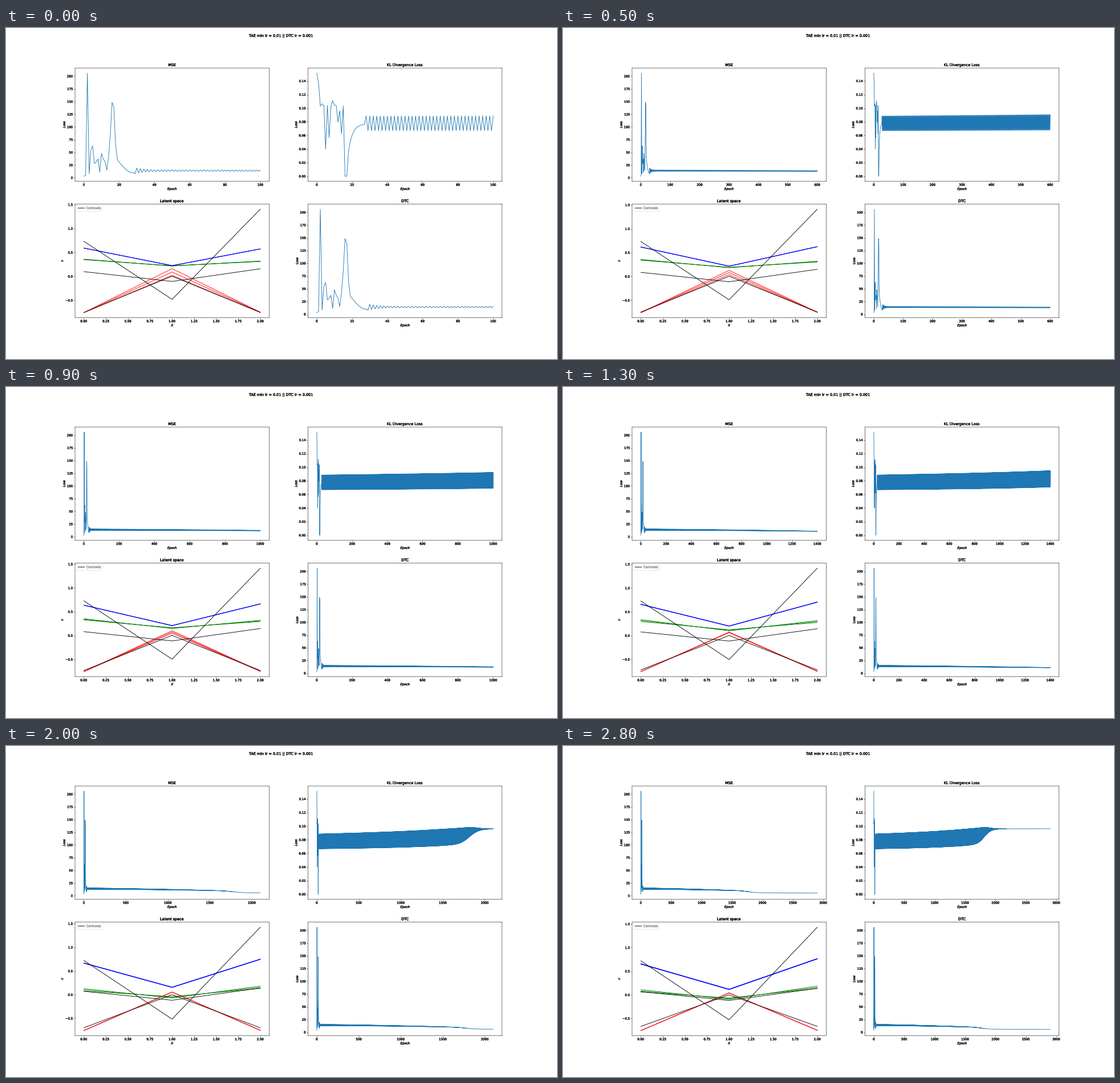
Animation of 966x580 px, one loop 2.9 s. Source, as a matplotlib script:

```python
import numpy as np
import matplotlib.pyplot as plt
from matplotlib.animation import FuncAnimation
from matplotlib.patheffects import Normal, withStroke

WIDTH, HEIGHT, DPI = 966, 580, 38.64
FRAMES, INTERVAL = 29, 100
STEP = 100  # epochs per frame
LAST = FRAMES * STEP

plt.rcParams.update({
    "font.family": "DejaVu Sans",
    "axes.linewidth": 1.0,
    "lines.linewidth": 1.65,
    "xtick.major.width": 1.0,
    "ytick.major.width": 1.0,
})
HEAVY = [withStroke(linewidth=0.65, foreground="black")]


def settle(epoch, center, width):
    """Smooth step from 0 to 1 around the center epoch."""
    return 1 / (1 + np.exp((center - epoch) / width))


def blend(a, b, weight):
    return a + (b - a) * weight


# --- training curves -------------------------------------------------------

EPOCHS = np.arange(LAST + 1)
T = EPOCHS / 1000


def training_curve(warmup, recovery, start, middle, swing):
    """Warm-up values, a smooth recovery, then a zigzag (even epochs high)."""
    curve = middle + swing * np.where(EPOCHS % 2, -1, 1)
    curve[:start] = recovery[:start]
    curve[:len(warmup)] = warmup
    return curve


mse = training_curve(
    warmup=[3, 5, 206, 8, 55, 62.5, 28, 31, 37, 11, 48, 37, 32, 15, 42, 85,
            148.5, 139, 64],
    recovery=9.7 + 26 * (np.abs(27.5 - EPOCHS) / 8.5) ** 1.6,
    start=29,
    middle=blend(14 - 1.9 * T ** 1.5, 6.8 - 0.5 * T,
                 settle(EPOCHS, 1790, 60)),
    swing=(1.4 * np.clip(1 - T / 1.9, 0, 1) ** 1.1
           + 5 * np.exp((29 - EPOCHS.clip(29)) / 5)))

kl = training_curve(
    warmup=[.1515, .137, .103, .1065, .104, .040, .104, .0565, .103, .111,
            .1045, .104, .0795, .096, .062, .1035, 0, 0],
    recovery=.077 - .040 * np.exp((18 - EPOCHS) / 2.3),
    start=28,
    middle=blend(.0776 + .0024 * T + .0007 * T ** 3, .0952 + .0004 * T,
                 settle(EPOCHS, 1810, 50)),
    swing=(.0108 + .0009 * T) * (1 - settle(EPOCHS, 1830, 60)))


# --- latent space ----------------------------------------------------------

# heights at x = 0, 1, 2: first pose, last pose, easing power
CENTROIDS = [
    ((.735, -.480, 1.405), (.720, -.528, 1.432), 1),
    ((.100, -.105, .160), (.068, -.118, .138), 0.5),
    ((-.755, .005, -.754), (-.667, .000, -.667), 1.25),
]


def latent_lines(epoch):
    """Three red, three green, three blue lines and the centroids."""
    t = epoch / 1000
    side = np.array([1, 0, -1])[:, None]

    red = np.array([-.757, .094 - .018 * t, -.750])
    red = red + side * [0, .075 * max(0, 1 - t / 1.5), .002]

    green = blend(
        np.array([.355 - .014 * t**2, .225 - .05 * t - .018 * t**2,
                  .318 - .010 * t]),
        np.array([.085, -.02 - .021 * t, .10 + .021 * t]),
        settle(epoch, 1800, 130))
    spread = .005 + .02 * min(t / 1.6, 1) ** 2
    green = green + side * spread * [1, -.6, 1]

    blue = blend(
        np.array([.588 + .05 * t, .227 - .018 * t, .565 + .10 * t]),
        np.array([.655, .203 - .03 * t, .66 + .036 * t]),
        settle(epoch, 2000, 150))
    blue = blue + side * (.001 + .0015 * t)

    progress = (epoch - STEP) / (LAST - STEP)
    centroids = [blend(np.array(first), np.array(last), progress ** power)
                 for first, last, power in CENTROIDS]
    return [*red, *green, *blue, *centroids]


# --- figure ----------------------------------------------------------------

fig = plt.figure(figsize=((WIDTH + 1e-6) / DPI, (HEIGHT + 1e-6) / DPI),
                 dpi=DPI, facecolor="white")
fig.suptitle("TAE min lr = 0.01 || DTC lr = 0.001", path_effects=HEAVY)

COLUMNS = [(225.5, 859.5), (986.5, 1620.5)]
ROWS = [(130.5, 500.5), (574.5, 945.5)]


def panel(row, column, title, xlabel, ylabel):
    left, right = (x / 1800 for x in COLUMNS[column])
    top, bottom = (1 - y / 1080 for y in ROWS[row])
    ax = fig.add_axes([left, bottom, right - left, top - bottom])
    ax.set_title(title, path_effects=HEAVY)
    ax.set_xlabel(xlabel, style="italic", path_effects=HEAVY)
    ax.set_ylabel(ylabel, style="italic", path_effects=HEAVY)
    for spine in ax.spines.values():
        spine.set_snap(False)
    return ax


losses = []
for row, column, title, curve in [(0, 0, "MSE", mse),
                                  (0, 1, "KL Divergence Loss", kl),
                                  (1, 1, "DTC", mse + kl)]:
    ax = panel(row, column, title, "Epoch", "Loss")
    losses.append((ax.plot([], [], color="C0")[0], curve))

latent = panel(1, 0, "Latent space", "X", "Y")
colors = np.repeat(["red", "green", "blue", "black"], 3)
strands = [latent.plot([], [], color=c)[0] for c in colors]
legend = latent.legend([strands[-1]], ["Centroids"], loc="upper left")
legend.get_texts()[0].set_path_effects([Normal()])


def update(frame):
    epoch = (frame + 1) * STEP
    for line, curve in losses:
        line.set_data(EPOCHS[:epoch + 1], curve[:epoch + 1])
    for line, heights in zip(strands, latent_lines(epoch)):
        line.set_data([0, 1, 2], heights)
    for ax in fig.axes:
        ax.relim()
        ax.autoscale_view()
        for label in ax.get_xticklabels() + ax.get_yticklabels():
            label.set_path_effects(HEAVY)
    return []


anim = FuncAnimation(fig, update, frames=FRAMES, interval=INTERVAL,
                     init_func=lambda: [], repeat=True, repeat_delay=0)
plt.show()
```
